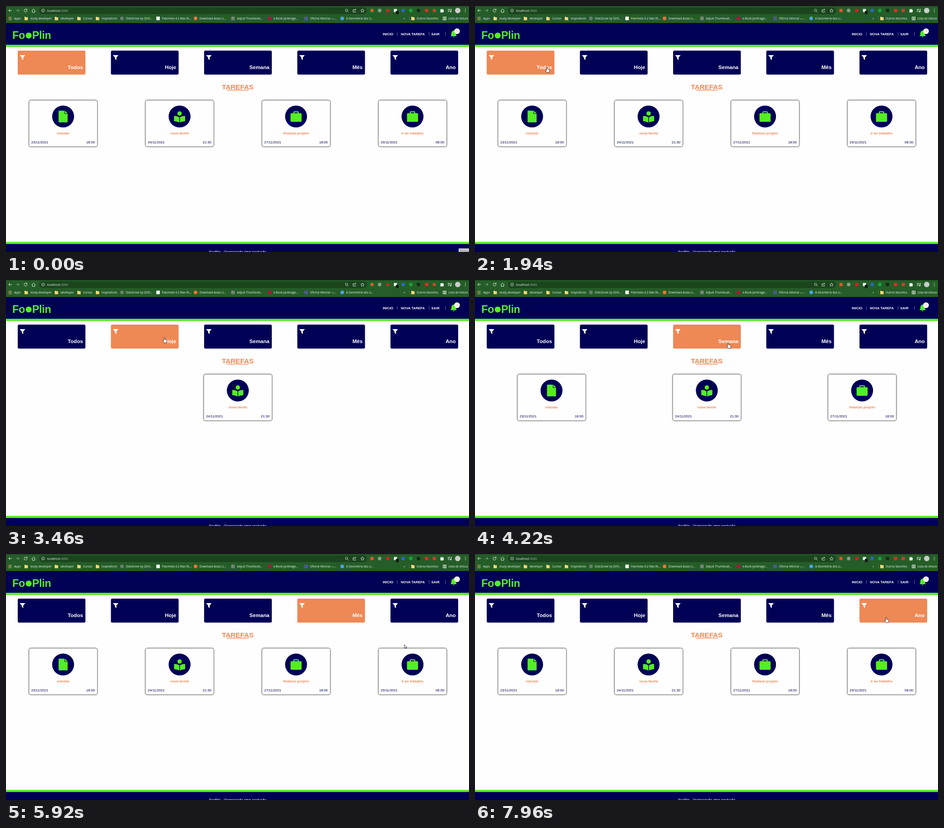
These frames come from a looping animation (1026x546 px, 8 s). An HTML page:

```html
<!DOCTYPE html>
<html lang="pt">
<head>
<meta charset="utf-8">
<title>Tarefas</title>
<style>
  html, body { margin: 0; width: 100%; height: 100%; overflow: hidden; background: #fefefe; }
  svg { display: block; width: 1026px; height: 546px; font-family: "Liberation Sans", Arial, sans-serif; }
  .chrome { font: 6.3px "Open Sans", "Noto Sans", sans-serif; fill: #f1f5f1; }
  .bold { font-weight: bold; }
  .logo { font-weight: bold; letter-spacing: -.3px; }
  .line { fill: none; stroke: #eef3ee; stroke-width: 1; }
  .sheet { fill: #fefefe; filter: drop-shadow(0 0 1.2px #000) drop-shadow(0 0 .8px #0008); }
</style>
</head>
<body>
<svg id="stage" viewBox="0 0 1026 546"></svg>
<script>
const LOOP = 8000;
const NAVY = '#000055', GREEN = '#55ee22', ORANGE = '#ee8855', PAPER = '#fefefe';

const rect = (x, y, w, h, fill, more = '') =>
  `<rect x="${x}" y="${y}" width="${w}" height="${h}" fill="${fill}" ${more}/>`;
const dot = (x, y, r, fill) => `<circle cx="${x}" cy="${y}" r="${r}" fill="${fill}"/>`;
const path = (d, fill, more = '') => `<path d="${d}" fill="${fill}" ${more}/>`;
const stroke = d => `<path class="line" d="${d}"/>`;
const text = (x, y, size, fill, str, more = '') =>
  `<text x="${x}" y="${y}" font-size="${size}" fill="${fill}" ${more}>${str}</text>`;
const label = (x, y, str) => `<text class="chrome" x="${x}" y="${y}">${str}</text>`;
const at = (x, y, body) => `<g transform="translate(${x} ${y})">${body}</g>`;

// Browser bars
const folder = x => path(`M${x} 24h3l1 1h3.5v6.5h-7.5z`, '#f5d774');
const folders = [[41, 'study developer'], [108, 'developer'], [158, 'Cursos'],
  [199, 'inspirations'], [898, 'Outros favoritos']];
const sites = [
  [253, '#6b7f70', 'DiskGrove by QVN...'], [333, '#f4f4f4', 'Palometa 4.2 Max RL...'],
  [416, '#f07430', 'Download Aulas Li...'], [499, '#768278', 'Adjust Thumbnail...'],
  [580, '#b5123c', 'e-Book Jardinage...'], [661, '#4d5796', 'Oficina Vetorial —...'],
  [741, '#45a5e6', 'A Geometria dos Li...']];
const extensions = [[811, '#e0562c'], [828, '#86a088'], [846, '#d42020'], [863, '#e8eee8'],
  [880, '#2868c0'], [897, '#12a83a'], [914, '#122c14'], [932, '#e02c24'], [949, '#d83a2c']];

function browserBars() {
  let s = rect(0, 0, 1026, 38, '#255d28') + rect(0, 0, 1026, 1, '#17401a') + rect(0, 37, 1026, 1, '#1c4a20');
  s += rect(73, 3, 727, 15, '#1a451d', 'rx="7.5"');
  s += stroke('M13 10H6M9 7L6 10L9 13') + `<g opacity=".5">${stroke('M22 10H29M26 7L29 10L26 13')}</g>`;
  s += stroke('M46 8A3.3 3.3 0 1 0 46.6 11M46.8 6.5V9H44') + stroke('M57 10.5L61 6.5L65 10.5M58.3 10V14H63.7V10');
  s += `<g opacity=".8">${stroke('M85.5 10a3.3 3.3 0 1 0-6.6 0a3.3 3.3 0 1 0 6.6 0M82.2 9.6V12M82.2 7.9V8.7')}</g>`;
  s += `<text class="chrome" x="91" y="12.6" style="font-size:6.9px">localhost<tspan fill="#a3b8a4">:3000</tspan></text>`;
  s += `<g opacity=".85">${stroke('M757 9.5a2.5 2.5 0 1 0-5 0a2.5 2.5 0 1 0 5 0M756.5 11.5L759 14')}${
    stroke('M771 8H769V13.5H775V12M771 11Q771 8 774 8M773 6L775.5 8L773 10')}${
    stroke('M790 6.3l1.2 2.5 2.7.4-2 1.9.5 2.7-2.4-1.3-2.4 1.3.5-2.7-2-1.9 2.7-.4z')}</g>`;
  extensions.forEach(([x, fill], i) => s += i % 3 == 1 ? dot(x, 10, 3.9, fill) : rect(x - 3.5, 6.5, 7, 7, fill, 'rx="1"'));
  s += rect(864, 11, 6, 7, '#0b120c', 'rx="1"') + label(865.8, 16.8, '.');
  s += path('M962.5 7.5h2.5q.9-2.5 1.8 0h2.7v2.3q2.4.9 0 1.8v2.6h-7v-2.4q1.8-.9 0-1.8z', '#fff');
  s += stroke('M979 7.5H985M979 10H984M979 12.5H982M986.5 12.5V7H988') + dot(985.5, 12.5, 1.4, '#fff');
  s += dot(1001, 10, 6, '#c9cdca');
  for (const y of [7, 10, 13]) s += dot(1018, y, .8, '#fff');

  for (let i = 0; i < 9; i++)
    s += rect(5.3 + i % 3 * 2.8, 24 + (i / 3 | 0) * 2.8, 1.8, 1.8, ['#e77565', '#e7c65c', '#70bb72'][i % 3]);
  s += label(18, 30, 'Apps');
  for (const [x, name] of folders) s += folder(x) + label(x + (x > 800 ? 12 : 13), 30, name);
  sites.forEach(([x, fill, name], i) =>
    s += (i % 2 ? rect(x, 23.5, 8, 8, fill, 'rx="1"') : dot(x + 4, 27.5, 4, fill)) + label(x + 12.7, 30, name));
  s += label(881, 30, '»') + rect(893, 23, .6, 9, '#568158');
  return s + stroke('M968.5 24.3H975.5V31H968.5ZM970 26H974M970 27.7H974M970 29.4H974') + label(980.5, 30, 'Lista de leitura');
}

// Page
const bell = path('M-1 -7Q0 -9 1 -7Q5 -6 5 -1Q5 3 7 5H-7Q-5 3 -5 -1Q-5 -6 -1 -7ZM-2 6H2Q0 9 -2 6Z', GREEN);

function header() {
  let s = rect(0, 38, 1026, 48, NAVY) + rect(0, 86, 1026, 5, GREEN);
  s += text(14, 73, 23.5, GREEN, 'Fo', 'class="logo"') + dot(50.3, 65.5, 6.6, GREEN) +
    text(58, 73, 23.5, GREEN, 'Plin', 'class="logo"');
  for (const [x, name] of [[835, 'INICIO'], [875, 'NOVA TAREFA'], [942.5, 'SAIR']])
    s += text(x, 64.7, 7.6, '#fff', name, 'class="bold"');
  for (const x of [866.7, 937, 973]) s += rect(x, 58, .8, 8, '#8080ac');
  return s + `<g id="bell">${at(992, 62, bell)}${dot(999.5, 56, 6.2, '#fff')}${
    text(999.5, 58.3, 6.5, ORANGE, '1', 'text-anchor="middle"')}</g>`;
}

const filters = ['Todos', 'Hoje', 'Semana', 'Mês', 'Ano'];
const filterX = i => 26 + 206.5 * i;
const funnel = path('M5 10H16Q16.5 10.6 16 11L12.2 15.3V21L9 18.6V15.3L5 11Q4.5 10.5 5 10Z', '#fff');
const filterButton = (name, i) => at(filterX(i), 99,
  rect(0, 0, 150, 53.3, NAVY, 'rx="3" class="button"') + funnel +
  text(144.7, 40.7, 11.6, '#fff', name, 'class="bold" text-anchor="end"'));

const icons = {
  file: path('M-9 -13H3V-6H10V12Q10 13 9 13H-9Q-10 13 -10 12V-12Q-10 -13 -9 -13ZM4 -13L10 -7H4Z', GREEN),
  book: dot(0, -6.8, 4.8, GREEN) + path('M-.7 2Q-5 -1.2 -11.5 -1.2Q-12.3 -1.2 -12.3 0V9.5Q-12.3 10.5 -11 10.5Q-5 11 -.7 13.2ZM.7 2Q5 -1.2 11.5 -1.2Q12.3 -1.2 12.3 0V9.5Q12.3 10.5 11 10.5Q5 11 .7 13.2Z', GREEN),
  bag: rect(-12.3, -7.2, 24.6, 19, GREEN, 'rx="2"') + path('M-5 -7V-9.5Q-5 -10.5 -4 -10.5H4Q5 -10.5 5 -9.5V-7', 'none', `stroke="${GREEN}" stroke-width="2.2"`)
};
const tasks = [
  ['file', 'estudar', '23/11/2021', '18:00'], ['book', 'nova tarefa', '24/11/2021', '21:30'],
  ['bag', 'finalizar projeto', '27/11/2021', '18:00'], ['bag', 'ir ao trabalho', '29/11/2021', '08:00']];
const card = ([icon, name, date, hour]) => `<g class="card">${
  `<rect class="sheet" x="-75.2" y="209.5" width="150.6" height="102.2" rx="4"/>` +
  dot(0, 245.3, 24.3, NAVY) + at(0, 245.3, icons[icon]) +
  text(0, 284.6, 7.7, ORANGE, name, 'class="bold" text-anchor="middle"') +
  text(-70.5, 305, 7.6, NAVY, date) + text(70.4, 305, 7.7, NAVY, hour, 'text-anchor="end"')}</g>`;

const outline = 'stroke="#111" stroke-width=".8" stroke-linejoin="round"';
const arrow = path('M0 0V8L2 6.3L3.3 9.2L4.6 8.7L3.3 5.8H5.8Z', '#fff', outline);
const hand = path('M-1 1Q0 -.6 1 1V4.6L5 5.6Q6 6 6 7.5L5 12.6H0L-3 8.6Q-3.3 6.6 -1 7.8Z', '#fff', outline);

const stage = document.getElementById('stage');
stage.innerHTML = rect(0, 0, 1026, 546, PAPER) + browserBars() + header() +
  filters.map(filterButton).join('') +
  text(513.7, 185.2, 15.3, ORANGE, 'TAREFAS', 'class="bold" text-anchor="middle"') + rect(489.5, 186, 48.5, 1.4, ORANGE) +
  tasks.map(card).join('') +
  rect(0, 523.4, 1026, 5, GREEN) + rect(0, 528.2, 1026, 18, NAVY) +
  text(513.5, 548, 7.6, '#fff', 'FovPlin - Organização gera produção', 'text-anchor="middle"') +
  `<g id="tip">${rect(1003, 538, 23, 8, '#c6c6ce')}${text(1006, 547.3, 6.5, '#777', 'Gravar')}</g>` +
  `<g id="pointer"><g id="arrow">${arrow}</g><g id="hand">${hand}</g></g>`;

const find = id => document.getElementById(id);
const buttons = [...stage.querySelectorAll('.button')], cards = [...stage.querySelectorAll('.card')];
const show = (node, on) => node.setAttribute('display', on ? 'inline' : 'none');

// Timeline: time, then value
const route = [
  [70, 1015, 530], [400, 900, 300], [850, 620, 250], [1180, 993, 58], [1670, 190, 128],
  [1730, 172, 134], [1940, 158, 135], [2160, 470, 140], [2410, 270, 125], [3459, 270, 125],
  [3460, 350, 127], [3810, 560, 139], [4220, 561, 139], [4500, 561, 139], [4780, 700, 135],
  [5050, 704, 135], [5250, 725, 170], [5520, 880, 196], [5919, 880, 196], [5920, 883.5, 201],
  [6250, 650, 240], [6450, 400, 235], [6720, 125, 138], [6860, 115, 137], [7130, 115, 137],
  [7300, 200, 170], [7620, 740, 165], [7880, 905, 139], [7960, 911, 140]];
const chosen = [[0, 0], [2740, 1], [4010, 2], [4850, 3], [7960, 4]];
const listed = [[0, [0, 1, 2, 3]], [2870, [1]], [4140, [0, 1, 2]], [5000, [0, 1, 2, 3]]];

const valueAt = (steps, t) => (steps.findLast(s => s[0] <= t) || steps[0])[1];

function pointerAt(t) {
  if (t < route[0][0]) return [-99, -99];
  const i = route.findLastIndex(p => p[0] <= t);
  const [t0, x0, y0] = route[i], [t1, x1, y1] = route[i + 1] || [LOOP, x0, y0];
  const k = (t - t0) / (t1 - t0);
  return [x0 + (x1 - x0) * k, y0 + (y1 - y0) * k];
}

const inside = ([px, py], x, y, w, h) => px >= x && px <= x + w && py >= y && py <= y + h;
const cardX = (i, n) => 513.7 + (i - (n - 1) / 2) * 1032.4 / n;

function overCard(t, id) {
  const list = valueAt(listed, t), i = list.indexOf(id);
  return i >= 0 && inside(pointerAt(t), cardX(i, list.length) - 75, 209, 150, 103);
}
const overBell = t => inside(pointerAt(t), 985, 50, 21, 20);

// Half opacity on hover, faded over 300 ms
function hoverOpacity(t, over) {
  let sum = 0;
  for (let k = 0; k < 12; k++) sum += over(t - k * 25);
  return 1 - sum / 24;
}

function render(t) {
  const pos = pointerAt(t), active = valueAt(chosen, t), list = valueAt(listed, t);
  let pointing = overBell(t);
  buttons.forEach((button, i) => {
    const over = inside(pos, filterX(i), 99, 150, 53);
    pointing ||= over;
    button.setAttribute('fill', over || i == active ? ORANGE : NAVY);
  });
  cards.forEach((node, id) => {
    const i = list.indexOf(id);
    pointing ||= overCard(t, id);
    show(node, i >= 0);
    node.setAttribute('transform', `translate(${cardX(i, list.length)} 0)`);
    node.setAttribute('opacity', hoverOpacity(t, s => overCard(s, id)));
  });
  find('bell').setAttribute('opacity', hoverOpacity(t, overBell));
  find('pointer').setAttribute('transform', `translate(${pos})`);
  show(find('hand'), pointing);
  show(find('arrow'), !pointing);
  show(find('tip'), t < 70);
}

const start = performance.now();
function tick() {
  render((performance.now() - start) % LOOP);
  requestAnimationFrame(tick);
}
tick();
</script>
</body>
</html>
```
